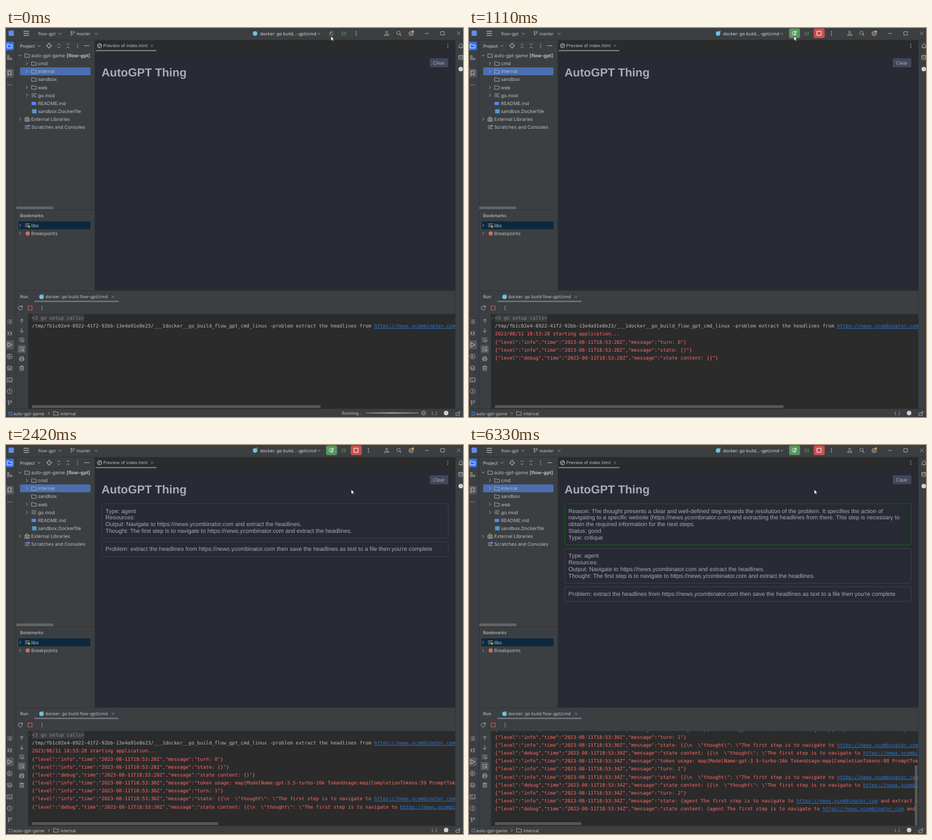
These frames come from a looping animation (811 px wide and 691 px high, 8 s). An HTML page:

```html
<!DOCTYPE html>
<html lang="en">
<head>
<meta charset="utf-8">
<title>IDE run session</title>
<style>
html, body { margin: 0; width: 100%; height: 100%; overflow: hidden; background: #3c3f41; }
svg { display: block; width: 811px; height: 691px; }
text { white-space: pre; text-rendering: geometricPrecision; }
.ui { font-family: Inter, "Open Sans", sans-serif; fill: #bbbdbf; }
.mono { font-family: "DejaVu Sans Mono", "Noto Sans Mono", monospace; font-size: 8.555px; fill: #bbbbbb; }
.mono .err { fill: #ff6b68; }
.mono .link { fill: #287bde; text-decoration: underline; }
.web { font-family: "Liberation Sans", Arial, sans-serif; font-size: 10.305px; fill: #a9acb6; }
</style>
</head>
<body>
<svg id="stage" viewBox="0 0 811 691" xmlns="http://www.w3.org/2000/svg"></svg>
<script>
const LOOP = 8000;
const SCALE = .644;                       // screen pixels per interface pixel
const SMALL = 12 * SCALE, BODY = 13 * SCALE;
const ROW = 14.15, LINE = 22 * SCALE, WEB_LINE = 18.4 * SCALE;
const GREY = '#afb1b3', BAR = '#3c3f41', DARK = '#2b2b2b', EDGE = '#313335';
const SITE = 'https://news.ycombinator.com';
const stage = document.getElementById('stage');

// Markup helpers
const esc = s => s.replace(/&/g, '&amp;').replace(/</g, '&lt;').replace(/>/g, '&gt;');
const rect = (x, y, w, h, fill, rx = 0, extra = '') =>
  `<rect x="${x}" y="${y}" width="${w}" height="${h}" rx="${rx}" fill="${fill}" ${extra}/>`;
const dot = (x, y, r, fill) => `<circle cx="${x}" cy="${y}" r="${r}" fill="${fill}"/>`;
const ring = (x, y, r, color = GREY, w = .9) =>
  `<circle cx="${x}" cy="${y}" r="${r}" fill="none" stroke="${color}" stroke-width="${w}"/>`;
const path = (x, y, d, color = GREY, w = .9, fill = 'none') =>
  `<path transform="translate(${x} ${y})" d="${d}" fill="${fill}" stroke="${color}" stroke-width="${w}" stroke-linecap="round" stroke-linejoin="round"/>`;
const ui = (x, y, s, size = SMALL, extra = '') =>
  `<text class="ui" x="${x}" y="${y}" font-size="${size}" ${extra}>${esc(s)}</text>`;
const title = (x, y, s) => ui(x, y, s, SMALL, 'font-weight="500"');
const group = (id, body, extra = '') => `<g id="${id}" ${extra}>${body}</g>`;

// Icons, each centred on x, y
const down = (x, y) => path(x, y, 'M-2.3-1L0 1.3L2.3-1');
const right = (x, y) => path(x, y, 'M-1-2.3L1.3 0L-1 2.3');
const cross = (x, y, r = 2, c = GREY) => path(x, y, `M${-r} ${-r}L${r} ${r}M${r} ${-r}L${-r} ${r}`, c, .8);
const kebab = (x, y, c = '#ced0d6') => [-3, 0, 3].map(d => dot(x, y + d, .85, c)).join('');
const folder = (x, y, c = GREY) => path(x, y, 'M-4-3H-1L.3-1.8H4V3.4H-4Z', c);
const bug = (x, y, c = GREY) => path(x, y, 'M-2-1.5Q0-4.5 2-1.5V1.5Q0 5 -2 1.5ZM-2 0H-4M2 0H4M-2-1.5L-3.7-3M2-1.5L3.7-3M-2 1.6L-3.7 3.2M2 1.6L3.7 3.2', c);
const branch = (x, y) => ring(x - 2, y - 2.5, 1.2) + ring(x + 2.4, y - 2.3, 1.2) +
  path(x, y, 'M-2-1.2V4M-2 1.8Q2.4 1.8 2.4-1');
const rerun = (x, y, c = GREY) => path(x, y, 'M3.4-1.6A3.7 3.7 0 1 0 3.6 1M3.6-4V-1.5H1', c, 1);
const lines = (x, y, c = GREY) => path(x, y, 'M-4-2.6H4M-4 0H2M-4 2.6H4', c);
const list = (x, y) => path(x, y, 'M-1.7-2.7H3.8M-1.7 0H3.8M-1.7 2.7H3.8M-3.7-2.7H-3.4M-3.7 0H-3.4M-3.7 2.7H-3.4');

function topBar() {
  return rect(4.5, 4.5, 9.5, 9.5, '#5b8def', 2) +
    path(36, 9.5, 'M-4.5-3.6H4.5M-4.5 0H4.5M-4.5 3.6H4.5', '#ced0d6', 1) +
    ui(57, 12.7, 'flow-gpt') + down(96, 10) + branch(118, 9.5) +
    ui(125, 12.7, 'master') + down(160, 10) +
    dot(442, 9.8, 4, '#6fc3de') + ui(450.7, 12.7, 'docker: go build...-gpt/cmd', SMALL, 'style="fill:#d0d2d6"') + down(555, 10) +
    bug(599.5, 9.7, '#57965c') +
    ring(675.5, 7.3, 1.8) + path(675.5, 9.5, 'M-3.6 3.8Q-3.4.8 0 .8M-3.6 3.8H.6M2.7 .8V4.4M.9 2.6H4.5') +
    ring(696.5, 8.7, 3) + path(696.5, 8.7, 'M2.2 2.2L4.4 4.4', GREY, 1.1) +
    ring(719, 9.7, 3.7, GREY, 1.2) + ring(719, 9.7, 1.4) + dot(722, 6.3, 2, '#e8a33e') +
    path(747, 9.7, 'M-3 0H3') + path(775, 9.5, 'M-3-3H3V3H-3Z') + cross(803.5, 9.5, 3);
}

function leftStrip() {
  return rect(-2, 24.5, 16, 15, '#3574f0', 3) + folder(6.5, 32, '#fff') +
    path(6.5, 52.5, 'M-3.5-3.5H-.8V-.8H-3.5ZM-3.5 1H-.8V3.7H-3.5ZM1.2 1H3.9V3.7H1.2Z') +
    rect(-2, 72.5, 16, 15.5, '#55585a', 3) + path(6.5, 80, 'M-2.6-4H2.6V4L0 1.7L-2.6 4Z', '#ced0d6') +
    [-3, 0, 3].map(d => dot(6.5 + d, 101, .8, GREY)).join('') +
    list(6.5, 521.5) + bug(6.5, 542.3) +
    rect(-2, 555, 16, 15.5, '#55585a', 3) + path(6.5, 562.7, 'M-3-3.8L4 0L-3 3.8Z', '#ced0d6') +
    path(6.5, 583.5, 'M-2.2-4H2.2L4.5 0L2.2 4H-2.2L-4.5 0Z') + path(6.5, 583.5, 'M-1-1.7L1.7 0L-1 1.7Z') +
    path(6.5, 604, 'M0-4L4.2-1.8L0 .4L-4.2-1.8ZM-4.2.4L0 2.5L4.2.4M-4.2 2.3L0 4.4L4.2 2.3') +
    path(6.5, 625, 'M-4.2-3.6H4.2V3.6H-4.2ZM-2.3-1.6L-.6 0L-2.3 1.6M.4 1.8H2.2') +
    ring(6.5, 645.3, 4.2) + path(6.5, 645.3, 'M0-2V.5M0 2V2.1', GREY, 1) + branch(6.5, 665.5);
}

function treeItem(i, x, label, icon, arrow) {
  const y = 48.8 + i * ROW;
  return (arrow ? arrow(x - 20, y) : '') + icon(x - 7.2, y) + ui(x - .3, y + 3.1, label, BODY);
}

function projectPane() {
  const mark = (x, y) => rect(x - 4.5, y - 2.5, 8, 5.5, '#548af7', .5);
  const image = (x, y) => rect(x - 3.5, y - 3.5, 8, 7.5, '#4a9cc9', 1);
  const library = (x, y) => path(x, y, 'M-4-2H-1.5V3.7H-4ZM-1.5-4H1.2V3.7H-1.5ZM1.2-1.5H4V3.7H1.2Z');
  const notes = (x, y) => lines(x, y) + dot(x + 2.7, y - 2.5, 1.9, '#548af7');
  return title(25, 34.5, 'Project') + down(58.5, 31.7) +
    ring(76.5, 31.5, 3.6) + path(76.5, 31.5, 'M0-5V-2M0 5V2M-5 0H-2M5 0H2') +
    path(94, 31.5, 'M-2.2-1.6L0-3.8L2.2-1.6M-2.2 1.6L0 3.8L2.2 1.6') +
    path(110, 31.5, 'M-2.4-4L0-1.6L2.4-4M-2.4 4L0 1.6L2.4 4') +
    kebab(127, 31.5, GREY) + path(143.5, 31.5, 'M-4 0H4', GREY, 1) +
    rect(25, 70, 125, 14, '#4b6eaf', 2) +
    treeItem(0, 45, 'auto-gpt-game', folder, down) +
    ui(107.6, 51.9, '[flow-gpt]', BODY, 'font-weight="700"') +
    treeItem(1, 57, 'cmd', folder, right) + treeItem(2, 57, 'internal', folder, right) +
    treeItem(3, 57, 'sandbox', folder) + treeItem(4, 57, 'web', folder, right) +
    treeItem(5, 57, 'go.mod', lines, right) + treeItem(6, 57, 'README.md', mark) +
    treeItem(7, 57, 'sandbox.Dockerfile', image) +
    treeItem(8, 45, 'External Libraries', library, right) +
    treeItem(9, 45, 'Scratches and Consoles', notes) +
    rect(18, 317, 66, 5, '#616466') + rect(18, 322.5, 140, 1, EDGE) +
    title(25, 336.2, 'Bookmarks') + rect(22, 343.5, 128, 14, '#0d293e', 2) +
    right(25, 350.5) + lines(38, 350.5) + rect(39.5, 351, 3, 3.6, '#d9a343') + ui(44.7, 353.7, 'libs', BODY) +
    right(25, 365) + dot(38.5, 365, 3.7, '#c77260') + ui(44.7, 368.2, 'Breakpoints', BODY);
}

function editor() {
  return rect(158, 22, 639, 20, DARK) + rect(158, 41.5, 639, 425, '#282a34') +
    ring(166, 31.5, 3.9, GREY, 1) + path(166, 31.5, 'M-3.5-1L-1 0L-.5 3M.5-3.5L1-1L3.5 0', GREY, 1.2) +
    ui(172.8, 34.3, 'Preview of index.html') + cross(259, 31.5, 1.9, '#868a8f') +
    rect(159, 39, 108, 2.3, '#747a80', 1) + kebab(784, 31.5, GREY) +
    `<text class="web" x="169.5" y="85.5" style="font-size:20.6px;font-weight:700">AutoGPT Thing</text>` +
    rect(752, 53.8, 33, 16, '#44475a', 2) +
    `<text class="web" x="757.8" y="65" style="font-size:8.6px">Clear</text>`;
}

function rightStrip() {
  return path(807, 32, 'M-3.5 2.3Q-2.3 1-2.3-1Q-2-4 .3-4Q2.7-4 2.8-1Q3 1 4 2.3ZM-.7 4H1.2') +
    path(807, 52.3, 'M-3.6-3V3Q0 5 3.6 3V-3Q0-5-3.6-3Q0-1 3.6-3M-3.6 0Q0 2 3.6 0') +
    dot(807, 73, 4, '#ced0d6');
}

function runPane() {
  const x = 28;
  return title(25, 480.2, 'Run') + dot(63, 477.5, 4, '#6fc3de') + dot(65.8, 474.3, 1.5, '#57965c') +
    ui(69.7, 480.2, 'docker: go build flow-gpt/cmd') + cross(190, 477.3, 1.9, '#868a8f') +
    rect(50, 484.6, 150, 2.2, '#747a80', 1) +
    rerun(25.5, 497.3) + path(42.8, 497.3, 'M-3.5-3.5H3.5V3.5H-3.5Z', '#db5c5c', 1.1) + kebab(64, 497.3, GREY) +
    path(x, 520.5, 'M0 3.5V-3.5M-3-.7L0-3.7L3-.7') + path(x, 537.3, 'M0-3.5V3.5M-3 .7L0 3.7L3 .7') +
    path(x, 554, 'M-4.3-3H4M-4.3 0H3Q4.4 0 4.4 1.4T3 3H-.3M1.2 1.4L-.4 3L1.2 4.5M-4.3 3H-2.5') +
    rect(20.5, 563, 14.5, 14.5, '#55585a', 2) +
    path(x, 570.3, 'M-4.3-3H4.3M-4.3 0H0M-4.3 3.4H4.3M2.5-1V2M1 .7L2.5 2.2L4 .7') +
    path(x, 587.5, 'M-2.5-1.3V-3.8H2.5V-1.3M-2.5 2H-4V-1.3H4V2H2.5M-2.5.6H2.5V3.8H-2.5Z') +
    path(x, 604, 'M-3.8-2.6H3.8M-1.2-2.6V-4H1.2V-2.6M-3-2.6V4H3V-2.6M-1-.6V2M1-.6V2');
}

function statusBar() {
  return path(8, 685, 'M-2.5-2.5H2.5V2.5H-2.5Z', '#548af7', 1) + ui(12.7, 687.5, 'auto-gpt-game') + right(76, 684.5) +
    folder(89, 684.3) + ui(96.7, 687.5, 'internal') +
    ui(755, 686.8, '{..}', 7.2) + dot(781, 684, 4, '#ced0d6') +
    path(802, 684.5, 'M-3.3-.5H2.5V3.7H-3.3ZM.8-.5V-2.5Q2.6-5 4.3-2.5V-1.5');
}

// Console lines; the address inside a message becomes a link
const log = (level, sec, msg) => `{"level":"${level}","time":"2023-08-11T18:53:${sec}Z","message":"${msg}`;
const usage = (sec, n) => log('info', sec, `token usage: map[ModelName:gpt-3.5-turbo-16k TokenUsage:map[CompletionTokens:${n} PromptTokens`);
const step = `The first step is to navigate to ${SITE} and extract the headlines`;
const thought = String.raw`{{\n  \"thought\": \"` + step;
const state = (sec, body) => [log('info', sec, 'state: ' + body), log('debug', sec, 'state content: ' + body)];
const consoleLines = [
  [0, '<3 go setup calls>'],
  [0, `/tmp/fb1c02e4-8922-41f2-92bb-13e4a91e8e23/___1docker__go_build_flow_gpt_cmd_linux -problem extract the headlines from ${SITE}`],
  [700, '2023/08/11 18:53:28 starting application...'],
  ...[log('info', 28, 'turn: 0"}'), ...state(28, '{}"}')].map(s => [1110, s]),
  [2220, usage(30, 59)],
  ...[log('info', 30, 'turn: 1"}'), ...state(30, thought)].map(s => [2420, s]),
  ...[usage(34, 80), log('info', 34, 'turn: 1"}'), ...state(34, thought),
    log('info', 34, 'turn: 2"}'), ...state(34, '{agent ' + step)].map(s => [6230, s])
];

function consoleText() {
  return rect(46, 509, 92.6, 13, '#393b3c') + path(42, 515.2, 'M-1-2L1 0L-1 2', '#777', .7) +
    consoleLines.map(([, s], i) => {
      const body = esc(s).replace(SITE, `<tspan class="link">${SITE}</tspan>`);
      const look = i > 1 ? 'class="err"' : i ? '' : 'style="fill:#8c8c8c"';
      return `<text id="line${i}" x="46" y="${518.1 + i * LINE}" ${look}>${body}</text>`;
    }).join('');
}

function card(id, y, h, rows, color = '#44475a') {
  return group(id, rect(169.8, y, 615, h, 'none', 3, `stroke="${color}" stroke-width=".8"`) +
    rows.map((s, i) => `<text class="web" x="176.6" y="${y + 16.3 + i * WEB_LINE}">${s}</text>`).join(''));
}

const agentRows = ['Type: agent', 'Resources:', `Output: Navigate to ${SITE} and extract the headlines.`,
  `Thought: The first step is to navigate to ${SITE} and extract the headlines.`];
const reasonRows = [
  'Reason: The thought presents a clear and well-defined step towards the resolution of the problem. It specifies the action of',
  `navigating to a specific website (${SITE}) and extracting the headlines from there. This step is necessary to`,
  'obtain the required information for the next steps.', 'Status: good', 'Type: critique'];

const spokes = Array.from({ length: 8 }, (_, i) =>
  `<path class="spoke" d="M0-2.2V-4.2" transform="rotate(${i * 45})" stroke="#ced0d6" stroke-linecap="round"/>`).join('');

stage.innerHTML =
  `<defs><clipPath id="clip"><rect x="39" y="508" width="758" height="168"/></clipPath>
   <linearGradient id="sheen" gradientUnits="userSpaceOnUse" x1="0" x2="94" spreadMethod="repeat">
     <stop offset="0" stop-color="#696c6e"/><stop offset=".5" stop-color="#a2a4a6"/><stop offset="1" stop-color="#696c6e"/>
   </linearGradient></defs>` +
  rect(0, 0, 811, 691, BAR) + rect(0, 21, 811, 1, EDGE) + rect(17, 22, 1, 654, EDGE) +
  rect(157, 22, 1, 445, EDGE) + rect(797, 22, 1, 654, EDGE) +
  topBar() + leftStrip() + projectPane() + editor() + rightStrip() +
  rect(18, 466, 779, 1, EDGE) + runPane() + rect(39, 508, 758, 168, DARK) +
  `<g clip-path="url(#clip)">${group('console', consoleText(), 'class="mono"')}</g>` +
  rect(46, 670, 512, 5, '#646464', 0, 'id="hbar" opacity=".75"') +
  rect(791, 545, 5, 107, '#646464', 0, 'id="vbar" opacity=".75"') +
  rect(0, 676, 811, 1, EDGE) + statusBar() +
  group('cards', card('critique', 104.3, 73.4, reasonRows, '#0a7a0f') +
    group('older', card('agent', 104.3, 61.5, agentRows) +
      card('problem', 172.1, 26, [`Problem: extract the headlines from ${SITE} then save the headlines as text to a file then you're complete`]))) +
  group('starting', `<g transform="translate(578 10)">${spokes}</g>` + kebab(621.5, 9.5)) +
  group('running', dot(445.3, 5.8, 1.6, '#57965c') + rect(568, .8, 19.5, 17.2, '#57965c', 3) + rerun(577.2, 9.3, '#fff') +
    path(578.7, 10.7, 'M-1-1.8L2.2 0L-1 1.8Z', '#fff', .8) +
    rect(611.7, .8, 19.5, 17.2, '#c94f4f', 3) + path(621.4, 9.4, 'M-3.6-3.6H3.6V3.6H-3.6Z', '#fff', 1) + kebab(643.3, 9.5)) +
  group('progress', ui(596, 686.6, 'Running...') + rect(638, 682.8, 94, 2.3, 'url(#sheen)', 1) +
    dot(741, 684, 4.6, '#6e7173') + cross(741, 684, 1.7, BAR)) +
  group('cursor', path(0, 0, 'M0 0V8L1.9 6.3L3.2 9.1L4.6 8.5L3.3 5.7H5.8Z', '#111', .6, '#fff'));

const el = id => document.getElementById(id);
const show = (id, on) => el(id).setAttribute('visibility', on ? 'visible' : 'hidden');
const place = (id, x, y) => el(id).setAttribute('transform', `translate(${x} ${y})`);
const spokeEls = document.querySelectorAll('.spoke');

function draw(t) {
  // Launch: spinner and background task
  const tick = Math.floor(t / 100);
  spokeEls.forEach((s, i) => s.setAttribute('opacity', 1 - ((tick - i + 16) % 8) * .1));
  el('sheen').setAttribute('gradientTransform', `translate(${638 + tick * 9} 0)`);
  show('starting', t < 300);
  show('running', t >= 300);
  show('progress', t < 500);

  // Pointer moves in five eased steps
  const k = Math.max(0, Math.min(5, Math.floor((t - 1210) / 100))) / 5;
  const ease = k * k * (3 - 2 * k);
  place('cursor', 576.6 + 36 * ease, 14.6 + 64.6 * ease);

  // Preview cards
  show('older', t >= 2120);
  show('critique', t >= 6030);
  place('older', 0, t >= 6030 ? 79.8 : 0);

  // Console output and scrollbars
  consoleLines.forEach(([at], i) => show('line' + i, t >= at));
  place('console', 0, t < 6230 ? 0 : t < 6330 ? -58.7 : -95.5);
  el('hbar').setAttribute('width', t < 2420 ? 512 : t < 6230 ? 330.5 : 153);
  show('vbar', t >= 6230);
  el('vbar').setAttribute('y', t < 6330 ? 545 : 569);
}

const start = performance.now();
function frame() {
  draw((performance.now() - start) % LOOP);
  requestAnimationFrame(frame);
}
draw(0);
requestAnimationFrame(frame);
</script>
</body>
</html>
```
